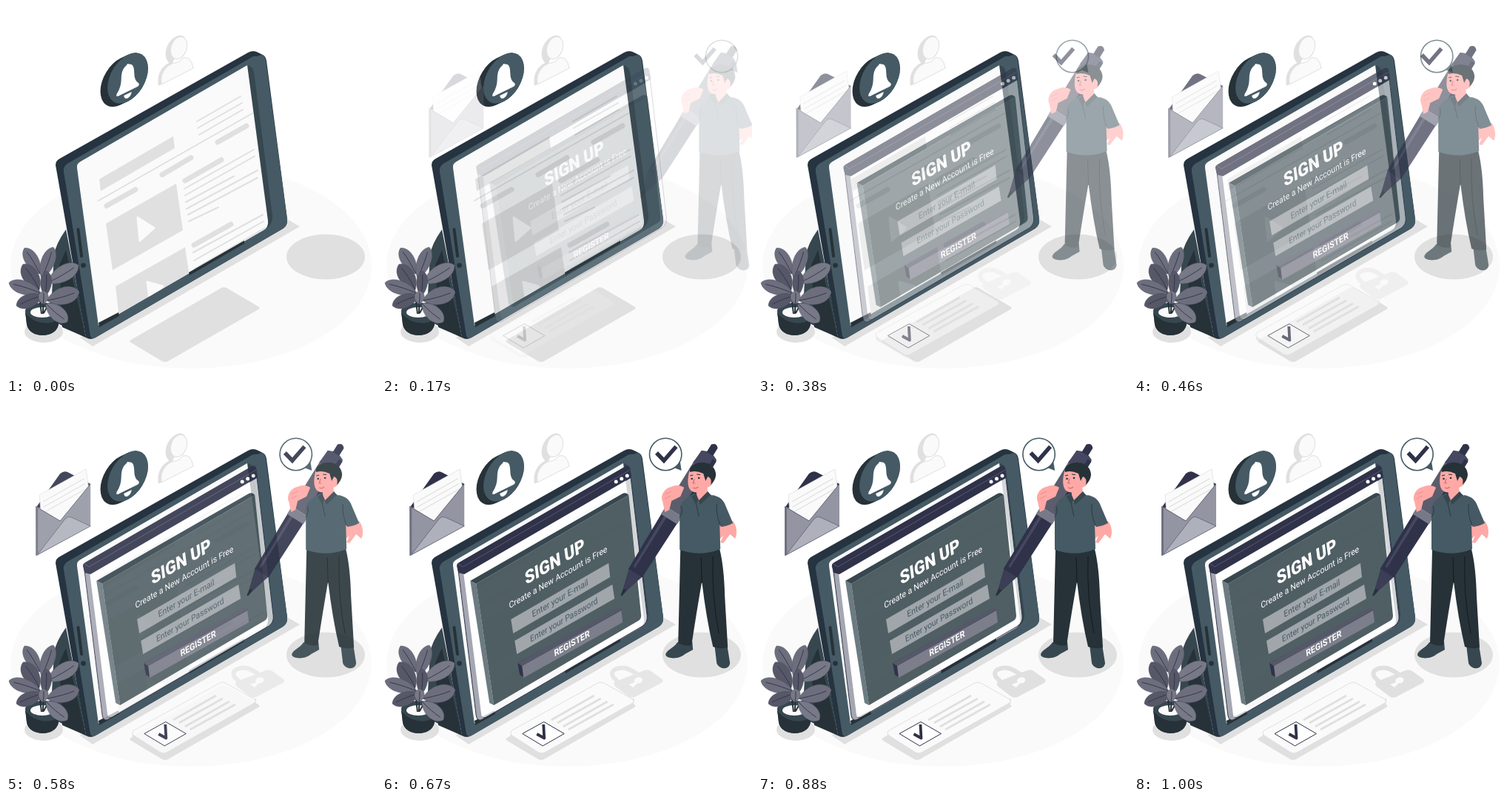
An HTML page for the animation above (1.04 s loop, 500x500 px).

```html
<!DOCTYPE html>
<html lang="en">
<head>
<meta charset="utf-8">
<title>Sign up</title>
<style>
html, body { margin: 0; width: 100%; height: 100%; overflow: hidden; background: #fff; }
svg { display: block; width: 100%; height: 100%; }
text { font-family: Roboto, Inter, sans-serif; }
.grey { fill: #e0e0e0; }
.rule { fill: none; stroke: #e0e0e0; stroke-width: 2; stroke-linecap: round; }
.thin { stroke-width: 1.3; }
.thick { stroke-width: 3; stroke-linecap: butt; }
.pill { fill: none; stroke: #e0e0e0; stroke-width: 7; stroke-linecap: round; }
.pale { fill: #fafafa; stroke: #e0e0e0; }
.ink { fill: #263238; }
.dusk { fill: #37474f; }
.slate { fill: #455a64; }
.navy { fill: #2f3249; }
.skin { fill: #ffa9a6; }
</style>
</head>
<body>
<svg viewBox="0 0 500 500" xmlns="http://www.w3.org/2000/svg">
  <defs>
    <clipPath id="screenClip"><path d="M96 219Q95 213 101 210L326 80L354 290Q355 299 348 303L125 432Z"/></clipPath>
  </defs>

  <!-- floor -->
  <ellipse cx="250" cy="351" rx="244" ry="139" fill="#fafafa"/>
  <g class="grey">
    <ellipse cx="432" cy="339" rx="53" ry="30.5"/>
    <ellipse cx="51" cy="440" rx="26" ry="15"/>
    <path d="M100 448L117 460L397 298L380 288Z"/>
    <path d="M169 451L291 381Q294 379 298 381L341 406Q344 408 341 410L219 480Q215 482 211 480L169 455Q166 453 169 451Z"/>
  </g>

  <!-- profile icon -->
  <g class="pale">
    <path class="grey" d="M206 107L206 97Q209 82 221 77C210 66 219 43 235 40L241 42L226 74L212 105Z"/>
    <path d="M210 106Q208 92 216 84Q221 78 229 77Q235 76 239 70Q250 67 253 84Z"/>
    <ellipse cx="233.500" cy="56.500" rx="10.500" ry="15.500" transform="rotate(18 233.500 56.500)"/>
  </g>

  <!-- bell badge -->
  <g transform="matrix(.87 -.42 0 1 164.500 97.500)">
    <rect x="-42.500" y="-31.500" width="74" height="63" rx="31.500" class="ink"/>
    <circle r="31.500" class="slate"/>
    <path fill="#fff" d="M-17 14Q-10 8 -10 -4C-10 -13 -6 -17 -2 -18Q0 -21 2 -18C6 -17 10 -13 10 -4Q10 8 17 14Q19 18 14 18H-14Q-19 18 -17 14ZM-6 21H6A6 6 0 0 1 -6 21Z"/>
  </g>

  <!-- tablet -->
  <path class="dusk" d="M81 302Q67 322 65 336L60 424L108 448L100 400Z"/>
  <path class="ink" d="M81 330L72 350L76 434L108 448Z"/>
  <path fill="#263340" d="M67 215Q67 209 73 206L327 63Q334 59 341 63L347 66Q351 68 352 74L380 288Q381 296 374 301L121 448Q114 452 108 448Z"/>
  <path class="slate" d="M78 224Q77 217 83 213L329 71Q334 67 339 68L346 66Q350 68 351 74L380 288Q381 297 374 301L121 448Q116 451 114 446Z"/>
  <path class="dusk" d="M326 80Q333 81 335 89L360 283Q361 293 353 300Z"/>
  <path fill="none" stroke="#263238" stroke-width="4" stroke-linecap="round" d="M97.500 302L102 338"/>
  <circle cx="104.500" cy="350.500" r="3.300" class="ink"/>
  <g clip-path="url(#screenClip)">
    <path fill="#fafafa" d="M90 60H370V440H90Z"/>
    <path class="grey" d="M126 234L226 176L228 192L128 250ZM135 294L230 240L239 303L144 357ZM148 379L242 326L248 366L153 422Z"/>
    <path fill="#fafafa" stroke="#fafafa" stroke-width="3" stroke-linejoin="round" d="M178 286L200 300L181 317ZM191 373L212 379L194 394Z"/>
    <path class="pill" d="M136 270L175 248M211 228L250 205M286 184L325 162M242 236L291 208M254 323L304 295"/>
    <path class="rule" d="M125 263L333 145M258 156L317 122M259 165L319 131M261 174L320 140
      M241 247L335 194M242 256L336 203M243 265L308 230M244 274L340 222M246 282L340 232M247 291L287 272
      M253 333L347 282M254 344L348 291M255 355L350 300"/>
  </g>
  <path class="ink" d="M125 428L152 414L153 419L126 434ZM247 360L322 317L322 321L248 364Z"/>

  <!-- plant -->
  <path class="dusk" d="M26 412L28 430C31 450 68 450 71 430L74 412Z"/>
  <path class="ink" d="M26 414L28 430C31 450 68 450 71 430L72 422C60 433 37 430 26 414Z"/>
  <ellipse cx="50" cy="412" rx="24" ry="11" class="dusk"/>
  <ellipse cx="49" cy="414" rx="16" ry="7" fill="#fafafa"/>
  <path fill="none" stroke="#263238" stroke-width="2" d="M48 416Q46 395 42 372M50 416Q50 390 52 365M51 415Q56 404 62 400"/>
  <g id="leaves"></g>

  <!-- envelope -->
  <g class="slide">
    <path class="navy" d="M38 139L70 94Q75 90 80 92L111 108L80 154Z"/>
    <path fill="#fafafa" stroke="#e0e0e0" stroke-width=".8" d="M42 123L105 88L110 126L76 160L44 146Z"/>
    <path class="rule thin" d="M47 132L102 101M48 139L103 108M49 146L104 115"/>
    <path fill="#9395a3" d="M37 138L70 158L111 108L111 165L38 205Z"/>
    <path fill="#aeb0bb" stroke="#565869" stroke-width=".7" d="M39 204L77 155Q81 151 85 153L111 165Z"/>
    <path fill="none" stroke="#4b4d5f" stroke-width=".8" d="M38 139L70 158L111 108"/>
    <path fill="#6f7180" d="M37 138L40 140L40 204L37 205Z"/>
  </g>

  <!-- sign-up window -->
  <g class="slide">
    <path fill="#fff" opacity=".78" d="M110 231L336 100L358 286Q359 295 352 300L142 422Q135 426 134 420Z"/>
    <path fill="#a4a6b1" d="M102 216L109 221L134 420Q135 425 139 424L133 427Q128 428 127 421Z"/>
    <path fill="none" stroke="#2f3249" d="M102 218L127 421Q128 428 134 427L352 300Q359 295 358 286L335 92"/>
    <path class="navy" d="M101 220Q100 216 104 214L329 84Q334 82 335 87L337 99L111 230L103 228Z"/>
    <path fill="none" stroke="#55586d" d="M103 216L109 220L335 89"/>
    <g fill="#fff"><circle cx="316" cy="105" r="2.500"/><circle cx="323.500" cy="101" r="2.500"/><circle cx="331" cy="97" r="2.500"/></g>
    <path class="dusk" d="M119 239L325 121Q330 119 333 123L127 243Z"/>
    <path fill="#6b7b81" d="M119 239L127 243L151 407L145 404Z"/>
    <path fill="#36484e" opacity=".87" d="M127 243L333 123L350 286Q350 291 346 293L151 407Z"/>
    <path fill="#a0a6aa" d="M174 291L306 215L308 234L177 310ZM179 320L311 244L314 263L182 338Z"/>
    <path class="navy" d="M183 350L320 275L324 278L191 369L186 366Z"/>
    <path fill="#555868" d="M183 350L320 274L324 278L189 354Z"/>
    <path fill="#7c7e8b" d="M189 354L323 279L325 295L191 370Z"/>
    <g id="labels"></g>
  </g>

  <!-- check card -->
  <g class="slideBack">
    <path class="grey" d="M174 442L174 451L213 474Q217 476 221 474L341 404L341 398Z"/>
    <path class="pale" d="M176 441L292 377Q296 375 300 377L339 399Q342 402 339 404L220 471Q216 473 212 471L176 448Q172 444 176 441Z"/>
    <path class="rule thick" d="M229 427L287 394M237 431L296 398M245 436L305 402M252 440L313 406"/>
    <path fill="#fff" stroke="#2f3249" d="M190 445.500L219 429.500L246.500 445.500L217.500 462Z"/>
    <path fill="none" stroke="#2f3249" stroke-width="3.800" stroke-linejoin="round" d="M209.500 446L219.500 451.500L218.500 433"/>
  </g>

  <!-- padlock -->
  <g id="lock">
    <path fill="none" stroke="#e0e0e0" stroke-width="6" d="M335 379L325 369C319 360 331 355 342 357Q349 359 360 367"/>
    <path class="grey" d="M328 375L367 360Q372 358 376 361L390 371Q394 374 390 377L354 396Q349 398 345 395L328 382Q324 378 328 375Z"/>
    <path fill="#fafafa" d="M355 371C360 367 368 371 363 376Q361 378 358 377L352 383L346 379L354 376Q352 373 355 371Z"/>
  </g>

  <!-- speech bubble -->
  <g id="bubble">
    <path class="slate" d="M391 85L404 90L402 77Z"/>
    <circle cx="382.500" cy="68" r="21.700" fill="#fff" stroke="#455a64" stroke-width="1.600"/>
  </g>
  <path id="tick" fill="none" stroke="#2f3249" stroke-width="5.500" d="M370.500 66L380.500 76.500L397 57.500"/>

  <!-- man with pen -->
  <g class="slide">
    <g transform="translate(323 259) rotate(32)">
      <path class="ink" d="M-1 0L-3 -12L3 -12L1 0Z"/>
      <path fill="#3b3e55" d="M-3 -10L-11 -38H11L3 -10Z"/>
      <path class="navy" d="M-11 -36L-12.500 -125H12.500L11 -36Z"/>
      <path fill="#454860" d="M-7 -42L-8 -122H-4L-4 -42Z"/>
      <path fill="#777988" d="M-13 -122H13V-134H-13Z"/>
      <path fill="#5b5d6c" d="M-12.500 -134L-13 -208H13L12.500 -134Z"/>
      <path fill="#454860" d="M-13 -204L-12 -224Q0 -231 12 -224L13 -204Z"/>
      <path class="navy" d="M-5 -226V-238Q0 -244 5 -238V-226Z"/>
      <path class="navy" d="M7 -222H13V-152Q10 -148 7 -152Z"/>
    </g>
    <path class="skin" d="M408 113C399 107 392 112 387 113C379 117 376 126 379 132L382 146L388 143L391 131L403 125Z"/>
    <path fill="none" stroke="#e58f91" d="M382 122L391 118M382 128L390 124"/>

    <path class="dusk" d="M399 322C394 330 383 333 383 339C385 345 402 345 409 338L420 332L419 321ZM449 325L452 350C455 359 469 360 470 350L466 325Z"/>
    <path class="ink" d="M403 197L400 323Q409 328 418 326Q425 280 432 240Q438 290 447 328Q457 332 467 329L463 260Q462 220 456 196Z"/>
    <path fill="none" stroke="#121a1e" d="M431 207L432 242M447 206Q445 260 455 310"/>

    <path class="skin" d="M455 160L474 158C480 166 480 176 477 182L470 176L461 188L457 187L461 178L451 187L448 185L456 176L445 181L444 178L454 169Z"/>
    <path class="slate" d="M446 123C456 125 460 129 463 135L474 161Q467 165 458 166L446 150Z"/>
    <path class="slate" d="M421 121C409 128 402 132 402 145L402 197Q430 207 457 196L456 160Q459 128 441 121Z"/>
    <path fill="none" stroke="#263238" stroke-width=".8" d="M452 135Q451 150 457 164M424 134L428 152M404 138Q407 145 402 153"/>
    <path class="skin" d="M424 112L426 133L440 122L439 108Z"/>
    <path class="dusk" d="M424 121L418 125L424 136L428 130ZM440 118L444 123L430 136L427 131Z"/>
    <path class="skin" d="M415 91C412 104 412 116 421 119Q429 121 437 113C447 113 451 101 444 98L440 86L424 84Z"/>
    <path class="ink" d="M416 92C414 83 424 79 433 79C445 79 451 88 451 96Q450 104 444 109Q446 100 440 98L437 104L434 94Q424 89 416 92Z"/>
    <g class="ink"><circle cx="418.500" cy="101" r="1.300"/><circle cx="428" cy="100" r="1.300"/></g>
    <path fill="none" stroke="#263238" stroke-width="1.100" d="M416 97L420 96M425 95L430 95.500"/>
    <path fill="none" stroke="#d46b70" stroke-width="1.200" d="M422 101L420 107L423 107M420 113Q424 115 427 112"/>
  </g>
</svg>
<script>
const FRAME = 1000 / 24, LOOP = 1040, LAST = 24;
const $ = id => document.getElementById(id);
const all = selector => [...document.querySelectorAll(selector)];
const clamp = v => Math.max(0, Math.min(1, v));

// Leaf: base x, y, tip x, y, half width, colour
const leaves = [
  [46, 362, 25, 327, 11, '#6d6e7d'], [48, 368, 64, 326, 11, '#6d6e7d'],
  [45, 383, 23, 349, 13, '#565868'], [56, 374, 98, 350, 13, '#777987'],
  [47, 388, 4, 374, 11, '#6d6e7d'], [53, 392, 55, 358, 9, '#565868'],
  [50, 391, 14, 405, 11, '#565868'], [55, 398, 99, 386, 14, '#6d6e7d'],
  [54, 402, 83, 427, 12, '#777987'], [50, 403, 51, 385, 8, '#777987']
];
$('leaves').innerHTML = leaves.map(([x, y, tx, ty, w, color]) => {
  const dx = tx - x, dy = ty - y, len = Math.hypot(dx, dy);
  const nx = -dy / len * w, ny = dx / len * w;
  const at = (u, side) => `${x + dx * u + nx * side} ${y + dy * u + ny * side}`;
  return `<path fill="${color}" stroke="#4b4d5c" stroke-width=".4" d="M${x} ${y}C${at(.25, 1)} ${at(.85, 1.2)} ${tx} ${ty}C${at(.85, -1.2)} ${at(.25, -1)} ${x} ${y}"/>
    <path fill="none" stroke="#2f3249" stroke-width=".9" d="M${x} ${y}Q${at(.5, .15)} ${at(.85, 0)}"/>`;
}).join('');

const labels = [
  ['SIGN UP', 194, 244.5, 24, 900, '#fff'],
  ['Create a New Account is Free', 172, 276.5, 11.7, 400, '#fff'],
  ['Enter your E-mail', 203, 288.5, 11.7, 400, '#455a64'],
  ['Enter your Password', 200.5, 322, 11.5, 400, '#455a64'],
  ['REGISTER', 233, 341.5, 12, 700, '#fff']
];
$('labels').innerHTML = labels.map(([label, x, y, size, weight, color]) =>
  `<text transform="matrix(.866 -.505 .13 1 ${x} ${y})" font-size="${size}" font-weight="${weight}" fill="${color}">${label}</text>`
).join('');

// Smooth curve through [time, value] points
function track(points, t) {
  const n = points.length - 1;
  if (t <= points[0][0]) return points[0][1];
  if (t >= points[n][0]) return points[n][1];
  const i = points.findIndex(p => p[0] > t) - 1;
  const slope = j => {
    const a = points[Math.max(0, j - 1)], b = points[Math.min(n, j + 1)];
    return j === n ? 0 : (b[1] - a[1]) / (b[0] - a[0]);
  };
  const [t0, v0] = points[i], [t1, v1] = points[i + 1];
  const h = t1 - t0, u = (t - t0) / h, u2 = u * u, u3 = u2 * u;
  return v0 * (2 * u3 - 3 * u2 + 1) + v1 * (3 * u2 - 2 * u3)
    + h * (slope(i) * (u3 - 2 * u2 + u) + slope(i + 1) * (u3 - u2));
}

const slideTrack = [[1, 30], [6, 23.3], [9, 14.6], [11, 9.2], [14, 3.2], [18, -1.5], [24, 0]];
const lockTrack = [[5, -27], [9, -23], [11, -21], [14, -16], [18, -9], [24, 0]];

function place(el, x, opacity) {
  el.setAttribute('transform', `translate(${x.toFixed(2)} 0)`);
  el.setAttribute('opacity', opacity.toFixed(3));
}

const sliding = all('.slide'), slidingBack = all('.slideBack');

function render(ms) {
  const step = Math.min(LAST, Math.floor((ms + 5) / FRAME));
  const x = track(slideTrack, step);
  const fade = clamp((step - 1.5) / 14);
  sliding.forEach(el => place(el, x, fade));
  slidingBack.forEach(el => place(el, -x, fade));
  place($('bubble'), x * 2.9, fade);
  place($('tick'), x * 2, fade);
  place($('lock'), track(lockTrack, step), clamp((step - 5) / 15));
}

const start = performance.now();
function tick() {
  render((performance.now() - start) % LOOP);
  requestAnimationFrame(tick);
}
render(0);
requestAnimationFrame(tick);
</script>
</body>
</html>
```
